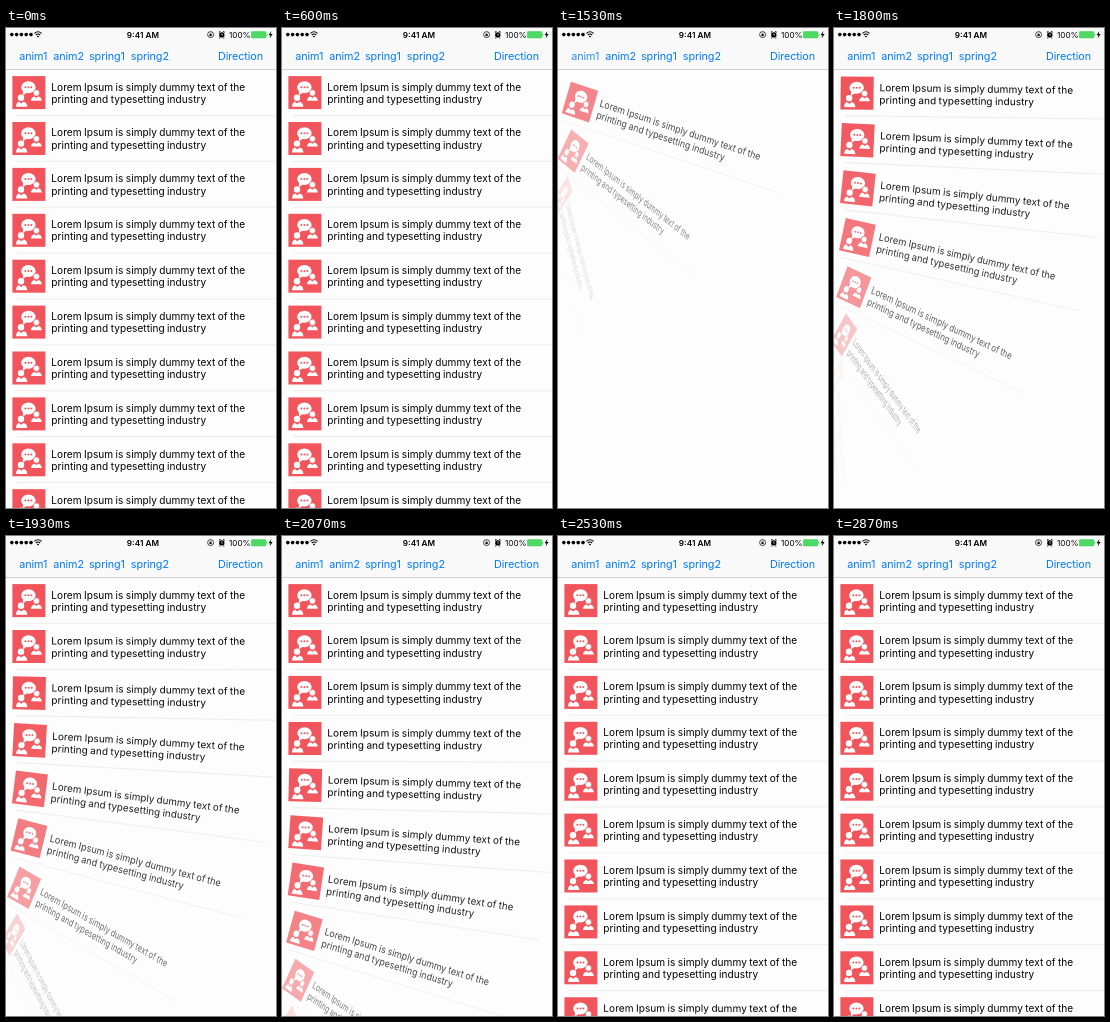
An HTML page that plays this animation: 270x480 px, repeating every 3070 ms.

```html
<!DOCTYPE html>
<html lang="en">
<head>
<meta charset="utf-8">
<title>Table row animation</title>
<style>
  html, body { margin: 0; width: 100%; height: 100%; overflow: hidden; background: #fff; }
  svg { display: block; width: 100%; height: 100%; font-family: Inter, sans-serif; }
  .nav { font-size: 10.8px; letter-spacing: -.08px; fill: #007aff; }
  .row { font-size: 10.08px; letter-spacing: .045px; word-spacing: -.5px; fill: #000; }
  .status { font-size: 8.2px; fill: #000; }
</style>
</head>
<body>
<svg viewBox="0 0 270 480" preserveAspectRatio="none">
  <defs>
    <!-- origin: middle of the row's left edge -->
    <g id="cell">
      <rect x="6.4" y="-16.4" width="33" height="33" fill="#f1545b"/>
      <g fill="#fff">
        <ellipse cx="22.4" cy="-5.2" rx="7.2" ry="6"/>
        <path d="M17 -2 L16.8 3 L21 0Z"/>
        <circle cx="30.4" cy="0.4" r="3.1" stroke="#f1545b" stroke-width=".6"/>
        <path d="M25 8.2 Q25.4 4.6 28.5 4 L30.4 5.4 L32.3 4 Q35.4 4.6 35.8 8.2Z"/>
        <circle cx="15" cy="5.2" r="3.2"/>
        <path d="M10 14.2 Q10.2 9.8 13 9.2 L15.2 11 L17.4 9.2 Q21 9.8 21.4 14.2Z"/>
      </g>
      <g fill="#f1545b">
        <circle cx="19.4" cy="-5.2" r="1"/>
        <circle cx="22.4" cy="-5.2" r="1"/>
        <circle cx="25.4" cy="-5.2" r="1"/>
      </g>
      <text class="row" x="45.3" y="-2">Lorem Ipsum is simply dummy text of the</text>
      <text class="row" x="45.3" y="10.3">printing and typesetting industry</text>
      <path d="M11 22.9H270" stroke="#e2e2e4" stroke-width=".6"/>
    </g>
  </defs>
  <rect width="270" height="480" fill="#fdfdfd"/>
  <g id="list"></g>

  <rect width="270" height="41.5" fill="#f9f9f9"/>
  <path d="M0 41.5H270" stroke="#cfcfd1"/>
  <g id="dots"></g>
  <g fill="none" stroke="#000" stroke-width="1.1">
    <path d="M28.4 5.4Q32 2.2 35.6 5.4M29.8 7Q32 5 34.2 7"/>
    <circle cx="204.6" cy="6.6" r="3" stroke-width=".7"/>
    <path d="M213 4.4L214.4 3.4M218.6 4.4L217.2 3.4M214 9.8L213.4 10.4M217.6 9.8L218.2 10.4"/>
  </g>
  <circle cx="215.8" cy="6.9" r="2.7"/>
  <path d="M215.8 5.4V7.1H217" fill="none" stroke="#f9f9f9" stroke-width=".6"/>
  <path d="M30.8 8.2Q32 7.2 33.2 8.2L32 9.6Z"/>
  <rect x="203.5" y="6.2" width="2.2" height="1.9"/>
  <path d="M204 6.3V5.6Q204.6 4.7 205.2 5.6V6.3" fill="none" stroke="#000" stroke-width=".5"/>
  <text class="status" x="136.9" y="9.7" text-anchor="middle" font-weight="600">9:41 AM</text>
  <text class="status" x="222.9" y="9.7">100%</text>
  <rect x="245.3" y="3.6" width="14.6" height="6.4" rx=".8" fill="#4cd964" stroke="#3fca58" stroke-width=".5"/>
  <path d="M260.8 5.6V8.1" stroke="#4cd964"/>
  <path d="M265.4 3L262.6 7.2H264.4L263.6 10.4L266.6 6.1H264.8Z"/>
  <g class="nav">
    <text id="pressed" x="13.2" y="31.6">anim1</text>
    <text x="47.2" y="31.6">anim2</text>
    <text x="83" y="31.6">spring1</text>
    <text x="124.8" y="31.6">spring2</text>
    <text x="257" y="31.6" text-anchor="end">Direction</text>
  </g>
</svg>
<script>
const LOOP = 3070, PRESS = 1330, RELOAD = 1400, FADE = 260;
const ROWS = 10, TOP = 64.5, PITCH = 45.9;
const START = 1332, STAGGER = 75, DURATION = 560, DRIFT = 13;
const AXIS = Math.hypot(0.7, 0.4), KY = 0.7 / AXIS, KZ = 0.4 / AXIS;

const NS = 'http://www.w3.org/2000/svg';
const $ = id => document.getElementById(id);
const clamp = v => Math.min(1, Math.max(0, v));

function add(parent, tag, attrs) {
  const el = document.createElementNS(NS, tag);
  for (const k in attrs) el.setAttribute(k, attrs[k]);
  return parent.appendChild(el);
}

const rows = Array.from({ length: ROWS }, () => add($('list'), 'use', { href: '#cell' }));
for (let i = 0; i < 5; i++) add($('dots'), 'circle', { cx: 5.8 + i * 4.8, cy: 6.6, r: 1.8 });

// cubic-bezier(.25, .1, .25, 1)
function ease(x) {
  if (x <= 0 || x >= 1) return clamp(x);
  const bez = (a, b, s) => 3 * a * s * (1 - s) ** 2 + 3 * b * s * s * (1 - s) + s ** 3;
  let lo = 0, hi = 1;
  for (let i = 0; i < 24; i++) {
    const mid = (lo + hi) / 2;
    if (bez(0.25, 0.25, mid) < x) lo = mid; else hi = mid;
  }
  return bez(0.1, 1, lo);
}

// The picture advances 15 times a second, on 10 ms boundaries.
function stepTime(t) {
  let n = Math.floor((t + 5) * 0.015);
  if (Math.round(n * 20 / 3) * 10 > t) n--;
  return n * 200 / 3;
}

// Flat projection of a turn about the axis (0, KY, KZ)
function swing(u, y) {
  const angle = (1 - u) * Math.PI / 2;
  const c = Math.cos(angle), s = Math.sin(angle), shift = DRIFT * u * (1 - u);
  const m = [c, KZ * s, -KZ * s, c + KY * KY * (1 - c), shift, y + shift];
  return `matrix(${m.map(v => v.toFixed(4)).join(' ')})`;
}

function draw(ms) {
  const t = stepTime(ms % LOOP);
  const idle = t < RELOAD - 1;
  rows.forEach((row, i) => {
    const u = idle ? 1 : ease((t - START - i * STAGGER) / DURATION);
    row.setAttribute('transform', swing(u, TOP + i * PITCH));
    row.setAttribute('opacity', u ** 0.75);
  });
  $('pressed').setAttribute('opacity', t < PRESS ? 1 : clamp(0.2 + 0.8 * (t - PRESS) / FADE));
}

const began = performance.now();
function tick() {
  draw(performance.now() - began);
  requestAnimationFrame(tick);
}
tick();
</script>
</body>
</html>
```
